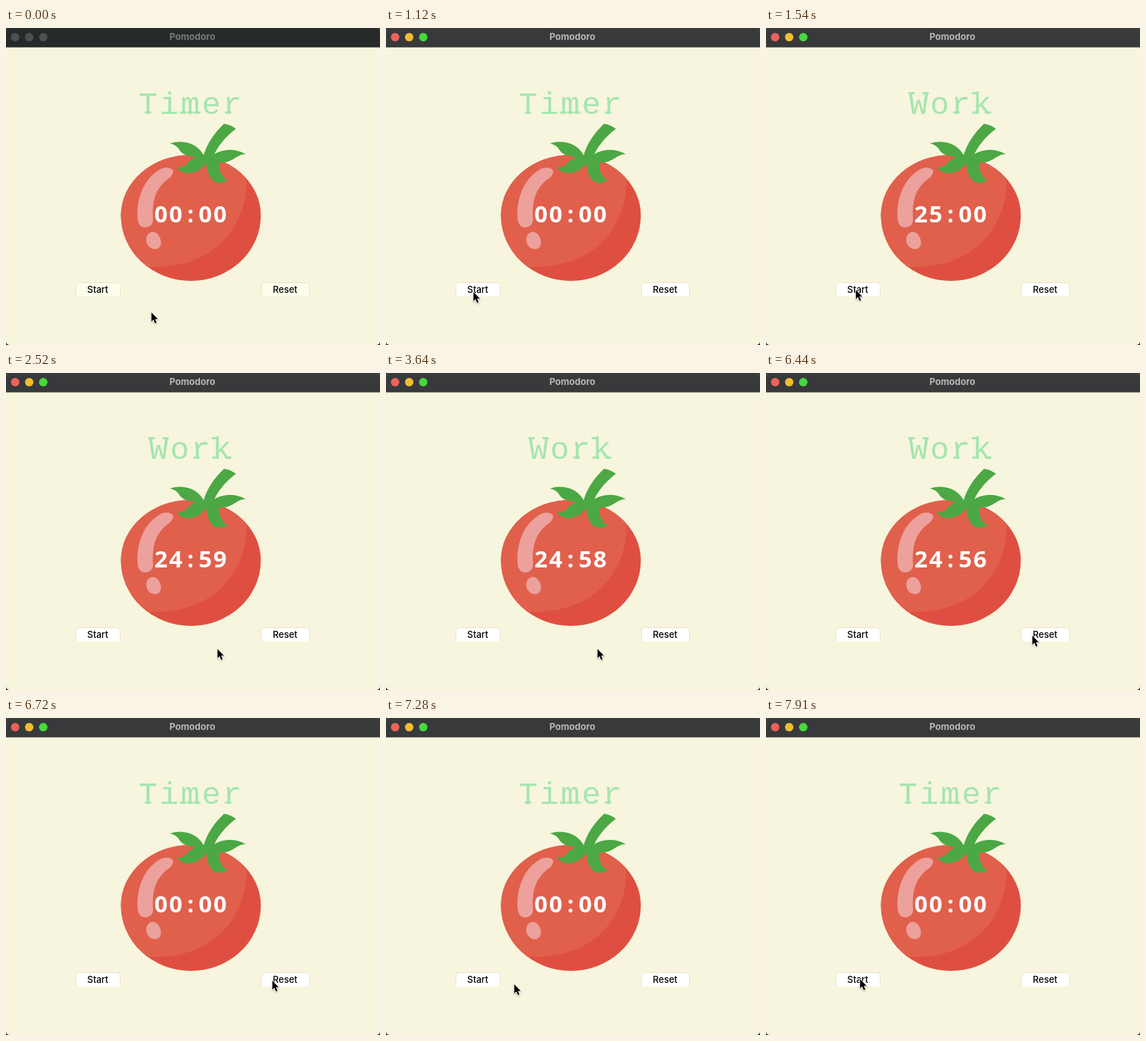
Recreate the animation shown at these times as an HTML page with a canvas. Size 532 by 450 pixels, loop 8 s.

```html
<!DOCTYPE html>
<html lang="en">
<head>
<meta charset="utf-8">
<title>Pomodoro</title>
<style>
  html, body { margin: 0; width: 100%; height: 100%; overflow: hidden; background: #1c2730; }
  canvas { display: block; }
</style>
</head>
<body>
<canvas id="stage" width="532" height="450"></canvas>
<script>
const ctx = document.getElementById('stage').getContext('2d');
const LOOP = 8000, STEP = 70, PRESS = 140;
const FOCUS = 280, STARTED = 1540, RESET = 6720;
const CREAM = '#f7f5dd', MINT = '#a5e6ae', LEAF = '#4ba845';

// Each move eases the pointer to a spot; bow bends the way there up or down
const MOVES = [
  { at: 0, took: 70, x: 241, y: 257 },
  { at: 210, took: 210, x: 283, y: 264 },
  { at: 490, took: 70, x: 119, y: 378 },
  { at: 1050, took: 280, x: 127, y: 371 },
  { at: 1680, took: 350, x: 300, y: 391 },
  { at: 5810, took: 630, x: 378, y: 372, bow: -23 },
  { at: 6930, took: 840, x: 133, y: 370, bow: 7 }
];

const body = new Path2D('M163.5 266A99.5 86 0 0 1 362.5 266A99.5 93 0 0 1 163.5 266Z');
const litSide = new Path2D('M341 205C348 262 312 342 205 339L150 345V170H341Z');
const shine = new Path2D('M238 203C236 198 226 196 217 202C197 214 186 240 187 268' +
  'C187 278 192 284 199 283C207 282 210 277 209 268C208 245 213 229 228 216Q238 210 238 203Z');
const drop = new Path2D('M200 297C202 289 211 287 216 293C221 299 223 309 216 313C207 317 197 307 200 297Z');
const leaves = [
  'M310 136Q319 137 327 143C312 155 300 168 294 185H280C285 164 296 150 310 136Z',
  'M233 164C253 157 275 165 283 184C266 183 251 182 246 172Q241 165 233 164Z',
  'M288 186C299 173 322 168 341 179C328 179 322 192 305 191Q296 191 288 186Z',
  'M283 181C271 180 260 188 254 196Q249 199 243 197C249 208 264 208 274 202Q284 196 288 185Z',
  'M284 183C285 198 287 210 295 217Q303 223 316 216C306 213 302 199 303 186Z'
].map(d => new Path2D(d));
const arrow = new Path2D('M0 0V13L3 10.3L5.2 15.4L7.4 14.5L5.2 9.5H9.2Z');

// Stem offsets of the letters that get a slab at the foot or at the head
const FEET = { T: [0], m: [-10, 0, 10], r: [-6], k: [-9, 9] };
const HEADS = { W: [-10, 10], k: [-10] };

function fill(path, color) {
  ctx.fillStyle = color;
  ctx.fill(path);
}

function label(text, x, y, font, color) {
  ctx.font = font;
  ctx.fillStyle = color;
  ctx.textAlign = 'center';
  ctx.fillText(text, x, y);
}

function spaced(text, centre, advance, drawChar) {
  const first = centre - advance * (text.length - 1) / 2;
  [...text].forEach((c, i) => drawChar(c, first + i * advance));
}

function pointerAt(t) {
  let x = 206, y = 403;
  for (const move of MOVES.filter(m => m.at <= t)) {
    const k = Math.min(1, (t - move.at) / move.took);
    const eased = 1 - (1 - k) ** 3;
    x += (move.x - x) * eased;
    y += (move.y - y) * eased + (move.bow || 0) * Math.sin(Math.PI * k);
  }
  return [x, y];
}

function drawTitleBar(active) {
  ctx.fillStyle = active ? '#38393b' : '#262a2b';
  ctx.fillRect(0, 0, 532, 27.5);
  ['#ed6259', '#f3bd30', '#46d83c'].forEach((color, i) => {
    ctx.beginPath();
    ctx.arc(13 + i * 20, 13, 6, 0, Math.PI * 2);
    ctx.fillStyle = active ? color : '#4d4f50';
    ctx.fill();
  });
  label('Pomodoro', 265, 17, 'bold 13px Inter, sans-serif', active ? '#b7b8b8' : '#797b7b');
}

function drawTomato() {
  fill(body, '#df4f41');
  ctx.save();
  ctx.clip(body);
  fill(litSide, '#e0604c');
  ctx.restore();
  fill(shine, '#eca19c');
  fill(drop, '#eca19c');
  leaves.forEach(leaf => fill(leaf, LEAF));
}

function drawHeading(text) {
  spaced(text, 262, 30, (c, x) => {
    label(c, x, 121.5, '45px "Liberation Mono", monospace', MINT);
    for (const dx of FEET[c] || []) ctx.fillRect(x + dx - 4.5, 118.5, 9, 3);
    for (const dx of HEADS[c] || []) ctx.fillRect(x + dx - 4.5, 91, 9, 3);
  });
}

function drawClock(text) {
  spaced(text, 262.5, 21, (c, x) =>
    label(c, x, 275.5, 'bold 33px "Noto Sans", sans-serif', '#fff'));
}

function drawButton(text, x, w, active, pressed) {
  ctx.save();
  ctx.beginPath();
  ctx.rect(x - 1, 360, w + 2, 21);
  ctx.clip();
  ctx.beginPath();
  ctx.roundRect(x + 0.5, 361.5, w - 1, 26, 5);
  ctx.fillStyle = pressed ? '#2b7df3' : active ? '#fff' : '#fdfdec';
  ctx.fill();
  ctx.strokeStyle = pressed ? '#2b7df3' : '#e6e4d2';
  ctx.stroke();
  ctx.restore();
  label(text, x + w / 2 - 0.5, 376, '500 13px Inter, sans-serif', pressed ? '#fff' : '#000');
}

function drawPointer(x, y) {
  ctx.save();
  ctx.translate(x + 0.8, y + 0.8);
  ctx.shadowColor = 'rgba(0,0,0,.3)';
  ctx.shadowBlur = 2;
  ctx.shadowOffsetY = 1;
  ctx.strokeStyle = '#fff';
  ctx.lineWidth = 1.6;
  ctx.lineJoin = 'round';
  ctx.stroke(arrow);
  ctx.shadowColor = 'transparent';
  fill(arrow, '#000');
  ctx.restore();
}

function draw(now) {
  const t = Math.floor(now % LOOP / STEP) * STEP;
  const active = t >= FOCUS;
  const running = t >= STARTED && t < RESET;
  const left = running ? 25 * 60 - Math.floor((t - STARTED + 60) / 1040) : 0;
  const pad = n => String(n).padStart(2, '0');
  const pressedBefore = end => t >= end - PRESS && t < end;

  ctx.fillStyle = '#1c2730';
  ctx.fillRect(0, 0, 532, 450);
  ctx.save();
  ctx.beginPath();
  ctx.roundRect(0, 0, 532, 450, 5);
  ctx.clip();
  ctx.fillStyle = CREAM;
  ctx.fillRect(0, 0, 532, 450);
  drawTitleBar(active);
  drawHeading(running ? 'Work' : 'Timer');
  drawTomato();
  drawClock(pad(Math.floor(left / 60)) + ':' + pad(left % 60));
  drawButton('Start', 99, 64, active, pressedBefore(STARTED));
  drawButton('Reset', 363, 69, active, pressedBefore(RESET));
  drawPointer(...pointerAt(t));
  ctx.restore();
}

const began = performance.now();
(function tick() {
  draw(performance.now() - began);
  requestAnimationFrame(tick);
})();
</script>
</body>
</html>
```
